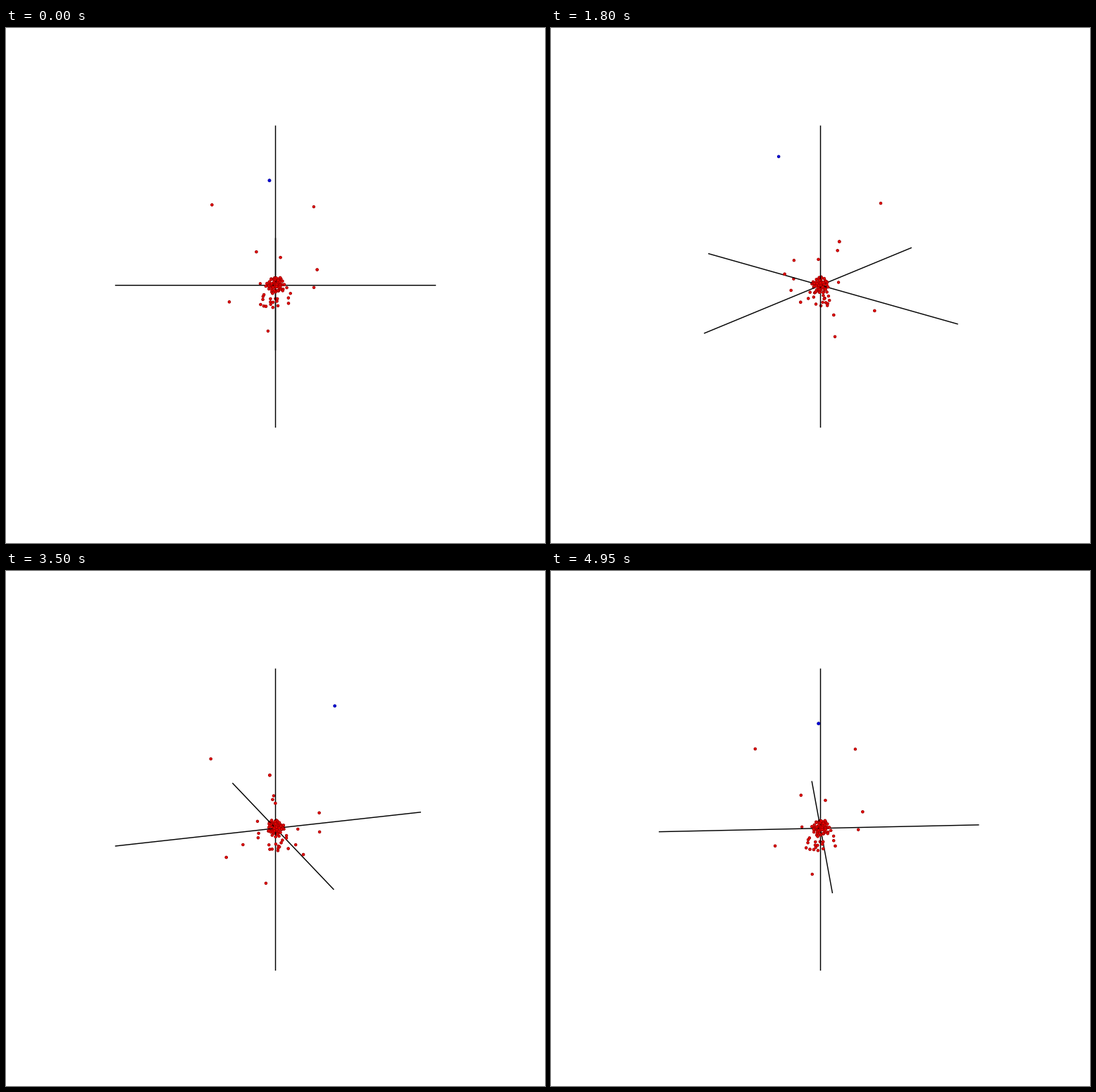
Recreate the animation shown at these times as a matplotlib script. Size 765x732 px, loop 5 s.

```python
import numpy as np
import matplotlib.pyplot as plt
from matplotlib.animation import FuncAnimation

W, H, DPI = 765, 732, 100
FRAMES, INTERVAL = 100, 50
CX, CY = W / 2, 365.7
AXIS = 227.7                      # half length of each axis, in pixels
PERSPECTIVE = 0.1687 / AXIS       # inverse camera distance
SIN_E, COS_E = np.sin(np.radians(20)), np.cos(np.radians(20))
PT = 72 / DPI                     # points per pixel
RED, BLUE = (0.93, 0, 0), (0, 0, 0.9)

# x to the right, y towards the viewer, z up, at the start of the turn
BLUE_DOT = [(-7.7, 83.2, 172.7)]
FAR_DOTS = [
    (-90, -37, 108), (56, -78, 94), (-27, -9, 47), (7, -2, 41),
    (58, 16, 29), (-65, 19, -18), (55, -10, -7), (-23, -79, -26),
    (22, -42, -28), (-13, 62, -8), (-13, 61, 21), (18, 40, -12),
    (-11, -18, -78),
]


def ball(rng, count, radius):
    """Random dots in a ball, denser towards its surface."""
    v = rng.normal(size=(count, 3))
    v /= np.linalg.norm(v, axis=1)[:, None]
    return v * radius * rng.random((count, 1)) ** 0.5


def fringe(rng, count):
    """Loose dots that hang below the centre."""
    xy = rng.normal(0, 11, (count, 2))
    return np.column_stack([xy, rng.uniform(-34, -8, count)])


rng = np.random.default_rng(4)
points = np.vstack([FAR_DOTS, fringe(rng, 18), ball(rng, 75, 13), BLUE_DOT])
faces = np.array([RED] * (len(points) - 1) + [BLUE])
edges = faces * 0.68


def project(p, angle):
    """Return screen positions, scale and distance in front of the centre."""
    c, s = np.cos(angle), np.sin(angle)
    x = p[:, 0] * c - p[:, 1] * s
    y = p[:, 0] * s + p[:, 1] * c
    z = p[:, 2]
    scale = 1 / (1 - PERSPECTIVE * (COS_E * y + SIN_E * z))
    up = COS_E * z - SIN_E * y
    return np.column_stack([CX + x * scale, CY - up * scale]), scale, y


fig = plt.figure(figsize=(W / DPI, H / DPI), dpi=DPI, facecolor="white")
ax = fig.add_axes([0, 0, 1, 1])
ax.set(xlim=(0, W), ylim=(H, 0))
ax.axis("off")

ends = [np.array([-v, v]) for v in AXIS * np.eye(3)]
lines = [ax.plot([], [], color="black", lw=1.45 * PT, zorder=2, snap=False,
                 solid_capstyle="butt")[0] for _ in ends]
back = ax.scatter([], [], linewidths=0.9 * PT, zorder=1)
front = ax.scatter([], [], linewidths=0.9 * PT, zorder=3)


def fill(dots, pick, xy, scale):
    dots.set_offsets(xy[pick])
    dots.set_sizes((3.6 * PT * scale[pick]) ** 2)
    dots.set_facecolor(faces[pick])
    dots.set_edgecolor(edges[pick])


def draw(i):
    angle = 2 * np.pi * i / FRAMES
    for line, pair in zip(lines, ends):
        line.set_data(*project(pair, angle)[0].T)
    xy, scale, depth = project(points, angle)
    order = np.argsort(scale)
    fill(back, order[depth[order] < 0], xy, scale)
    fill(front, order[depth[order] >= 0], xy, scale)
    return [back, *lines, front]


anim = FuncAnimation(fig, draw, frames=FRAMES, interval=INTERVAL,
                     repeat=True, repeat_delay=0)
plt.show()
```
